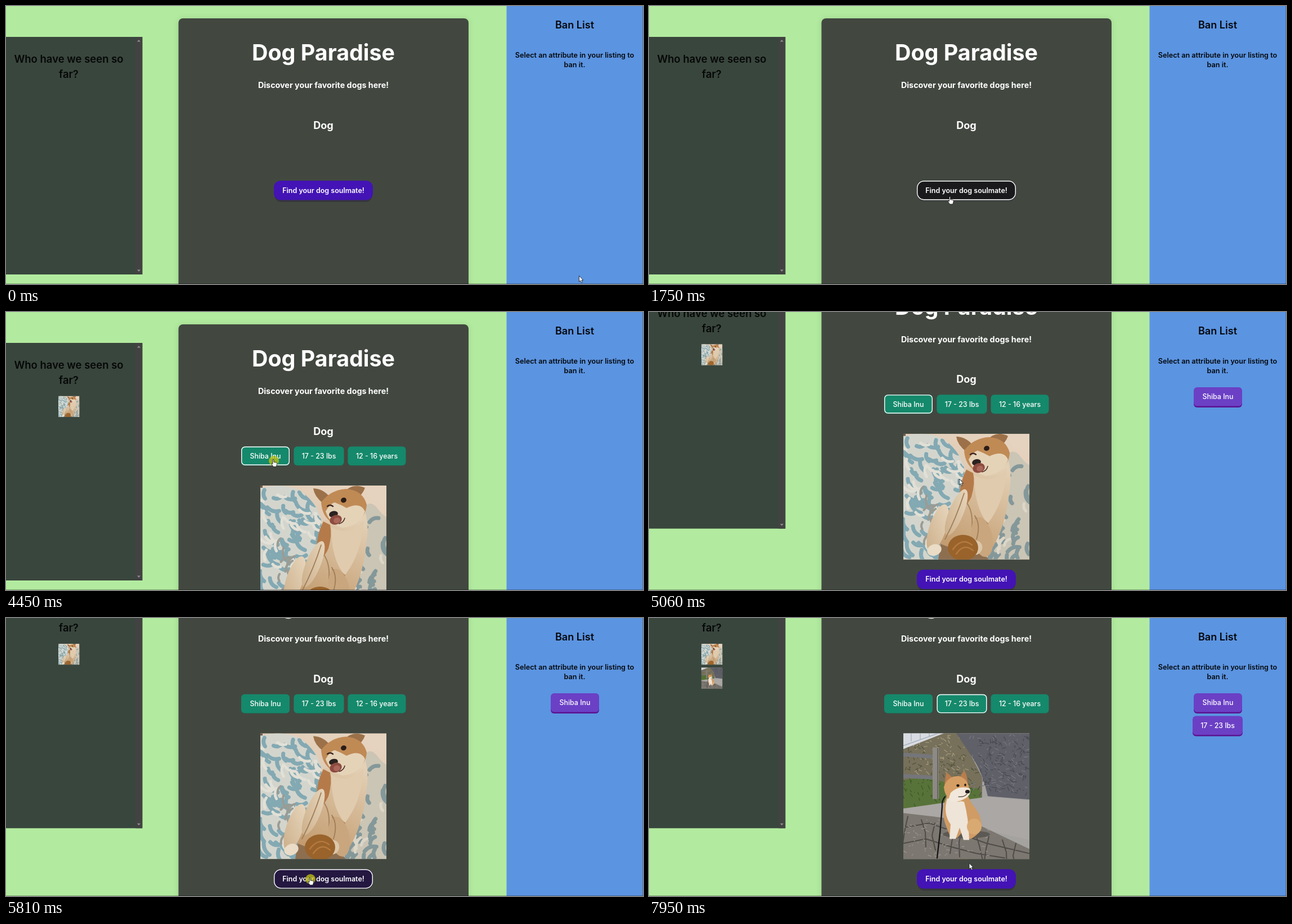
An HTML page that plays this animation: 1132 by 495 pixels, repeating every 8 s.

```html
<!DOCTYPE html>
<html lang="en">
<head>
<meta charset="utf-8">
<title>Dog Paradise</title>
<style>
  html, body { margin: 0; width: 100%; height: 100%; overflow: hidden; background: #b2eb9f; }
  #stage { display: block; width: 100vw; height: 100vh; }
  text { font-family: Inter, "Open Sans", sans-serif; font-weight: 600; text-anchor: middle; }
  .bold { font-weight: 700; }
  .medium { font-weight: 500; }
</style>
</head>
<body>
<svg id="stage" viewBox="0 0 1132 495"></svg>
<script>
const LOOP = 8000;
const stage = document.getElementById('stage');

// ---------- drawing helpers ----------
function makeRandom(seed) {
  return () => (seed = (seed * 16807) % 2147483647) / 2147483647;
}
const path = (d, fill, extra = '') => `<path d="${d}" fill="${fill}" ${extra}/>`;
const line = (d, stroke, width, extra = '') =>
  `<path d="${d}" fill="none" stroke="${stroke}" stroke-width="${width}" stroke-linecap="round" ${extra}/>`;
const oval = (x, y, rx, ry, fill, turn = 0) =>
  `<ellipse rx="${rx}" ry="${ry}" fill="${fill}" transform="translate(${x} ${y}) rotate(${turn})"/>`;
const box = (x, y, w, h, fill, r = 0, extra = '') =>
  `<rect x="${x}" y="${y}" width="${w}" height="${h}" rx="${r}" fill="${fill}" ${extra}/>`;
const label = (x, y, size, fill, words, cls = '') =>
  `<text x="${x}" y="${y}" font-size="${size}" fill="${fill}" class="${cls}">${words}</text>`;
const outline = (id, x, y, w, h, r) =>
  `<rect id="${id}" x="${x + .7}" y="${y + .7}" width="${w - 1.4}" height="${h - 1.4}" rx="${r}" fill="none" stroke="#fff" stroke-width="1.4"/>`;
const gradient = (id, from, to) =>
  `<linearGradient id="${id}" x1=".7" y1="0" x2=".3" y2="1"><stop stop-color="${from}"/><stop offset="1" stop-color="${to}"/></linearGradient>`;

// Woven leaves: short bent strokes fanning around one direction.
function leaves(seed, count, x0, y0, w, h, color, width, angle) {
  const rnd = makeRandom(seed);
  let d = '';
  for (let i = 0; i < count; i++) {
    const turn = angle + (rnd() - .5) * 1.6, len = 12 + rnd() * 14;
    const dx = Math.cos(turn) * len, dy = Math.sin(turn) * len;
    d += `M${x0 + rnd() * w} ${y0 + rnd() * h}q${dx * .5 - dy * .3} ${dy * .5 + dx * .3} ${dx} ${dy}`;
  }
  return line(d, color, width);
}

// Short scratches giving stone and grass some grain.
function grain(seed, count, x0, y0, w, h, color, dx, dy) {
  const rnd = makeRandom(seed);
  let d = '';
  for (let i = 0; i < count; i++)
    d += `M${x0 + rnd() * w} ${y0 + rnd() * h}l${dx * (rnd() - .3)} ${dy * (rnd() - .3)}`;
  return line(d, color, 1.3);
}

function loungingDog() {
  const left = 'M4 4Q40-6 72 10Q104 34 109 66Q104 110 84 150L62 224H0V4Z';
  const right = 'M184 42Q192 24 206 38Q216 52 224 56V224H148Q176 140 184 42Z';
  return gradient('fur', '#e3d0b5', '#c39c70') + gradient('limb', '#e6d5bc', '#cdb08b') + gradient('wall', '#e6d3bf', '#d3b99e') +
    `<clipPath id="leftPillow"><path d="${left}"/></clipPath><clipPath id="rightPillow"><path d="${right}"/></clipPath>` +
    box(0, 0, 224, 224, 'url(#wall)') + box(0, 0, 4, 40, '#6d5c50') +
    path(left, '#d3d5cd') +
    `<g clip-path="url(#leftPillow)">${leaves(71, 80, -8, 4, 112, 216, '#83a9b3', 7, .7)}${leaves(5, 36, -8, 0, 112, 216, '#e2e0d6', 5, .9)}${leaves(23, 14, 30, 90, 50, 110, '#9a9c94', 4, 2)}</g>` +
    path(right, '#cbc5b5') +
    `<g clip-path="url(#rightPillow)">${leaves(29, 36, 150, 50, 74, 172, '#84989a', 7, 2)}${leaves(97, 12, 150, 60, 70, 150, '#dcd6c8', 5, 2)}</g>` +
    path('M62 224Q70 160 100 120L130 200L152 224Z', '#8d6f50') +
    path('M112 62Q102 88 102 112Q84 128 72 150L66 196Q112 216 154 210Q182 168 188 104Q194 72 186 46Q150 60 112 62Z', 'url(#fur)') +
    path('M112 64Q98 90 100 126Q110 136 121 112Q128 88 124 70Z', '#b57a49') +
    path('M126 74Q158 92 184 62Q180 122 150 160Q126 132 126 74Z', '#e0cbae') +
    line('M112 122Q124 138 122 166M150 160Q140 150 128 150', '#a5835c', 2) +
    oval(61, 168, 15, 44, 'url(#limb)', 18) + oval(94, 140, 13, 44, 'url(#limb)', 22) +
    oval(140, 184, 18, 36, '#c9a67d', -12) + oval(128, 203, 12, 13, '#dcc7aa', 30) +
    oval(55, 207, 13, 10, '#eadcc6', -20) +
    line('M108 106Q94 150 74 188M127 146Q138 162 130 188', '#9f7d57', 1.8) +
    oval(106, 203, 27, 23, '#99632b') + line('M88 206q16-22 34-8M94 214q14-20 30-6', '#b67a3f', 2.4) +
    path('M94 5Q112 6 123 20L112 32Q96 20 94 5ZM148 12Q164-6 186 4Q182 16 170 24Z', '#9c7149') +
    path('M108 30Q124 8 152 6Q182 8 189 34Q188 56 168 66Q146 76 128 66Q110 56 108 30Z', '#c08a55') +
    path('M116 46Q124 32 132 30Q143 34 153 40Q178 28 186 46Q178 72 146 75Q124 70 116 46Z', '#e5d3b8') +
    oval(148, 26, 5, 4.4, '#2a1c18', -20) + line('M119 37q5-4 10 0', '#3b2720', 2.4) +
    oval(130, 51, 8, 5.5, '#2b2220', -12) +
    oval(134, 61, 11, 8.5, '#8d4b40', -18) + oval(136, 62, 6, 5, '#a9675a', -18) +
    line('M140 68Q148 66 150 58', '#4c3029', 1.6);
}

function sittingDog() {
  const stones = [[0, 168, 46, 160, 92, 176, 148, 196, 224, 214], [0, 196, 40, 188, 84, 202, 130, 214, 180, 222]]
    .map(p => 'M' + p.join(' ')).join('');
  let joints = '';
  for (let i = 0; i < 9; i++) joints += `M${8 + i * 24} ${148 + i * 6}l${i % 2 ? 7 : -5} 22l${i % 3 * 5 - 4} 26`;
  return box(0, 0, 224, 224, '#a5a3a0') +
    path('M0 24L72 0H100L140 78V122H0Z', '#77705a') +
    grain(17, 90, 0, 20, 128, 60, '#51543a', 10, 9) + grain(83, 70, 20, 4, 90, 70, '#a39a7c', 9, 8) +
    path('M0 84Q30 74 70 86T136 98L140 122L70 138H0Z', '#587339') +
    grain(43, 90, 0, 80, 126, 48, '#3d5829', 6, 10) +
    path('M0 0H72L0 28Z', '#d8dce2') + line('M0 22L62 0M14 0V14M30 0V10M46 0V6', '#a9b0b8', 1.3) +
    path('M94 0H224V118L150 112Q142 74 126 48Z', '#5f6068') +
    grain(9, 130, 132, 4, 88, 102, '#4a4a52', 14, 10) + grain(61, 80, 120, 2, 98, 100, '#777780', 12, 8) +
    line('M0 38L58 42M0 76L56 79', '#75767a', 7, 'stroke-linecap="butt"') +
    box(52, 25, 11, 92, '#8d8984') + line('M61 27V116', '#686663', 2) +
    path('M0 134L70 124L150 113L224 120V190L130 168L70 152L0 152Z', '#aaa7a4') +
    path('M0 142L68 150L140 166L224 206V224H0Z', '#7c7770') +
    line(stones + joints, '#4f4c48', 2) + grain(37, 80, 0, 154, 150, 64, '#99948c', 8, 4) +
    oval(112, 180, 42, 7, '#5c5853') +
    path('M80 106Q66 134 74 160L84 186H96L108 172L112 188H120Q138 178 139 164Q138 144 122 126Q112 108 112 100Z', '#d09b64') +
    path('M78 116Q70 144 84 162L82 188H93L100 168L107 190H117Q116 150 108 122Z', '#eee4d8') +
    oval(126, 166, 13, 14, '#d9a972') +
    path('M73 92L76 70Q82 72 89 82ZM98 82L108 66Q116 78 113 94Z', '#b77d4d') +
    path('M72 96Q78 76 98 76Q114 80 117 98Q119 118 98 122Q74 120 72 96Z', '#d59e64') +
    path('M84 106Q98 92 118 98Q122 110 108 117Q92 126 80 118Z', '#f1e7da') +
    oval(97, 93, 2.6, 2.4, '#201815') + oval(110, 92, 1.7, 2.2, '#201815') +
    oval(114, 104, 4, 3.2, '#221c1b') + line('M98 113Q108 114 113 108', '#4b372e', 1.2) +
    line('M74 113Q68 120 69 130Q66 176 60 222', '#18181a', 2.4);
}

// ---------- page pieces ----------
const attributes = [['Shiba Inu', 418, 86], ['17 - 23 lbs', 511.5, 89], ['12 - 16 years', 607.5, 103]];
const pill = ([words, x, w], i) =>
  box(x, 240, w, 34, '#2b5c4d', 6) + box(x, 239.5, w, 33.5, '#15896b', 6) +
  label(x + w / 2, 261, 12.4, '#fff', words, 'medium') + outline('pick' + i, x, 239.5, w, 33.5, 6);
const banned = (id, words, x, y, w) =>
  `<g id="${id}">${box(x, y + 3, w, 33, '#5c1390', 6)}${box(x, y, w, 33.5, '#6b40c5', 6)}${label(x + w / 2, y + 21, 12.4, '#fff', words, 'medium')}</g>`;
const photo = (id, art, x, y) => `<svg id="${id}" x="${x}" y="${y}"><use href="#${art}"/></svg>`;

stage.innerHTML = `
<defs>
  <g id="lounging">${loungingDog()}</g><g id="sitting">${sittingDog()}</g>
  <filter id="soft"><feGaussianBlur stdDeviation="6"/></filter>
</defs>
${box(0, 0, 1132, 495, '#b2eb9f')}
<g id="page">
  ${box(0, 55, 242, 423, '#39463d')}${box(230, 55, 12.5, 423, '#424242')}
  ${path('M233 63.5h6l-3-3.5zM233 469.5h6l-3 3.5z', '#8f8f8f')}
  ${label(111.5, 101, 18.5, '#060807', 'Who have we seen so')}${label(111.5, 128, 18.5, '#060807', 'far?')}
  ${photo('thumb1', 'lounging', 93, 149.5)}${photo('thumb2', 'sitting', 93, 192)}
  ${box(306, 22, 516, 700, '#000', 8, 'opacity=".1" filter="url(#soft)"')}
  ${box(306.5, 22, 515.5, 700, '#424840', 8)}
  ${label(564, 97, 39.4, '#fff', 'Dog Paradise', 'bold')}
  ${label(564, 146, 14.3, '#fff', 'Discover your favorite dogs here!', 'bold')}
  ${label(564, 218.5, 18.1, '#fff', 'Dog', 'bold')}
  <g id="pills">${attributes.map(pill).join('')}</g>
  ${photo('main1', 'lounging', 452, 309)}${photo('main2', 'sitting', 452, 309)}
  <g id="find">
    ${box(477, 315, 174, 34, '#37363c', 12, 'id="findShadow"')}
    ${box(476, 311, 176, 34.5, '#4313b5', 12, 'id="findFace"')}
    ${label(564, 332.5, 12.5, '#fff', 'Find your dog soulmate!')}
    ${outline('findRing', 476, 311, 176, 34.5, 12)}
  </g>
</g>
${box(889.5, 0, 242.5, 495, '#5b94e1')}
${label(1010.5, 40, 18.1, '#05080c', 'Ban List')}
${label(1010.5, 91.5, 12.6, '#05080c', 'Select an attribute in your listing to')}
${label(1010.5, 109, 12.6, '#05080c', 'ban it.')}
${banned('ban1', 'Shiba Inu', 968, 134, 86)}${banned('ban2', '17 - 23 lbs', 966, 174.5, 89)}
${box(0, 494, 1132, 1, '#000', 0, 'opacity=".3"')}${box(1131, 0, 1, 495, '#000', 0, 'opacity=".2"')}
<g id="pointer">
  <circle id="press" cx="1" cy="3" r="9" fill="#c4c414" opacity=".75"/>
  <path id="arrow" d="M0 0V10.5L2.4 8.3L4.2 12.2L6 11.4L4.3 7.6H7.3Z" fill="#fff" stroke="#111" stroke-width=".8"/>
  <path id="hand" d="M-1 1Q0-.8 1 1V5.2L5.5 6Q7 6.4 6.8 8L6 11L5.3 13.4H.2L-3 9Q-3.6 7.4-2.4 7.4L-1 8.6Z" fill="#fff" stroke="#111" stroke-width=".8"/>
</g>`;

// ---------- timeline ----------
const tracks = {
  pointer: [[0, 1018.5, 480.5], [70, 1018.5, 480.5], [70, 669, 355], [210, 669, 355], [480, 622, 347], [990, 554, 360],
    [1060, 554, 360], [1560, 534.5, 339.5], [2290, 534.5, 339.5], [2560, 531, 311], [2900, 531, 311], [3560, 475, 262],
    [4580, 475, 262], [5200, 573.5, 307.5], [5270, 573.5, 307.5], [5600, 546, 438], [5760, 540, 462], [6050, 540, 462],
    [6210, 536.5, 354.5], [6740, 536.5, 354.5], [7420, 561, 182], [7560, 554, 156], [7640, 554, 156], [7920, 569, 436.5]],
  scroll: [[4700, 0], [4830, 46], [4960, 78], [5080, 95], [5200, 102], [5260, 102], [5270, 103.7]],
  shade: [[1380, 0], [1630, 1], [2140, 1], [2140, 0], [5620, 0], [5870, 1], [6050, 1], [6210, 0]],
  first: [[2350, 0], [2350, .35], [2560, 1]],
  thumb: [[6670, 0], [6670, .28], [6790, .28], [6800, 1]],
  second: [[6800, 0], [6800, .35], [6930, 1]]
};
const shown = {
  pills: [[2140, LOOP]],
  pick0: [[3560, 5810]],
  pick1: [[7560, LOOP]],
  pick2: [],
  findRing: [[1620, 4450], [5810, 7560]],
  ban1: [[4580, LOOP]],
  ban2: [[7630, LOOP]],
  press: [[1620, 1740], [4440, 4580], [5810, 5940], [7560, 7630]],
  hand: [[1400, 2140], [3500, 4650], [5620, 6060], [7480, 7680]]
};

const el = Object.fromEntries([...stage.querySelectorAll('[id]')].map(node => [node.id, node]));
const within = (spans, t) => spans.some(([from, to]) => t >= from && t < to);
const show = (node, on) => node.setAttribute('visibility', on ? 'inherit' : 'hidden');

function valueAt(track, t) {
  const next = track.findIndex(key => key[0] > t);
  if (next === 0) return track[0].slice(1);
  if (next < 0) return track[track.length - 1].slice(1);
  const a = track[next - 1], b = track[next];
  const k = (t - a[0]) / (b[0] - a[0]);
  return a.slice(1).map((v, i) => v + (b[i + 1] - v) * k);
}

// Photos arrive from the top down.
function reveal(node, size, part) {
  show(node, part > 0);
  node.setAttribute('width', size);
  node.setAttribute('height', size * part);
  node.setAttribute('viewBox', `0 0 224 ${224 * part}`);
}

function mix(from, to, k) {
  return `rgb(${from.map((v, i) => Math.round(v + (to[i] - v) * k))})`;
}

function render(t) {
  const [x, y] = valueAt(tracks.pointer, t);
  const read = name => valueAt(tracks[name], t)[0];
  for (const id in shown) show(el[id], within(shown[id], t));
  show(el.arrow, !within(shown.hand, t));
  el.pointer.setAttribute('transform', `translate(${x} ${y})`);
  el.page.setAttribute('transform', `translate(0 ${-read('scroll')})`);
  el.find.setAttribute('transform', `translate(0 ${t < 2140 ? 0 : 240})`);
  const shade = read('shade');
  el.findFace.setAttribute('fill', mix([67, 19, 181], [26, 26, 29], shade));
  el.findShadow.setAttribute('opacity', within(shown.findRing, t) ? .3 : 1 - .7 * shade);
  reveal(el.main1, 224, read('first'));
  reveal(el.thumb1, 37.5, read('first'));
  reveal(el.main2, 224, read('second'));
  reveal(el.thumb2, 37.5, read('thumb'));
}

const start = performance.now();
function tick() {
  render((performance.now() - start) % LOOP);
  requestAnimationFrame(tick);
}
tick();
</script>
</body>
</html>
```
